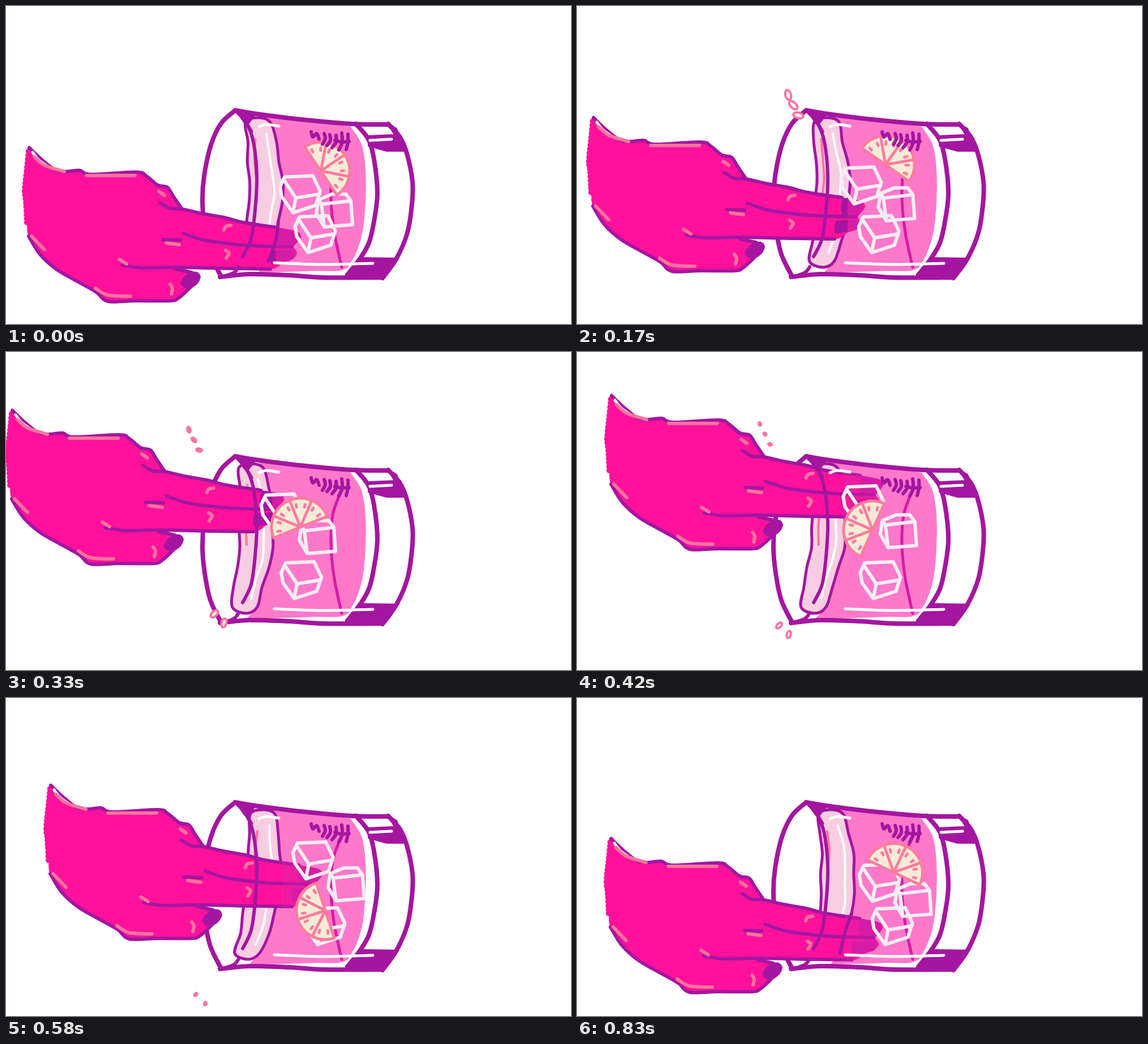
Write an HTML page that moves like this. It is 998 px wide and 561 px high and loops after 910 ms.

```html
<!DOCTYPE html>
<html lang="en">
<head>
<meta charset="utf-8">
<title>Stirring a drink</title>
<style>
  html, body { margin: 0; width: 100%; height: 100%; overflow: hidden; background: #fff; }
  svg { display: block; width: 100%; height: 100%; --ink: #a416a0; --skin: #ff119c; --nail: #a416a0; }
  path { fill: none; stroke-linecap: round; stroke-linejoin: round; }
  .ink { stroke: var(--ink); stroke-width: 6; }
  .thick { stroke-width: 8; }
  .block { fill: var(--ink); stroke: var(--ink); stroke-width: 2; }
  .skin { fill: var(--skin); }
  .nail { fill: var(--nail); }
  .cuff { stroke: var(--skin); stroke-width: 10; stroke-dasharray: 0 7; }
  .blush { stroke: #ff739f; stroke-width: 6; }
  .white { stroke: #fff; stroke-width: 5; }
  .fine { stroke-width: 4; }
  .ice { stroke: #f3eef3; stroke-width: 6; }
  .rind { stroke: #ff7c9e; stroke-width: 5; }
  .foam { fill: #f8cde2; stroke: #a416a0; stroke-width: 5; }
  .liquid { fill: #ff79cb; }
  .straw { stroke: #d81ba6; stroke-width: 5; }
  #wetHand { --ink: #bb18a3; --skin: #f01aa2; --nail: #d61ba4; }
</style>
</head>
<body>
<svg viewBox="0 0 998 561" preserveAspectRatio="none">
  <defs>
    <clipPath id="dry"><rect id="dryBox" x="-50" width="500" height="561"/></clipPath>
    <clipPath id="wet"><rect id="wetBox" width="300" height="561"/></clipPath>
    <g id="hand"></g>
  </defs>
  <g id="back"></g>
  <path id="liquid" class="liquid"/>
  <g id="straw"></g>
  <path id="foam" class="foam"/>
  <path id="foamPink" class="blush fine"/>
  <path id="foamWhite" class="white fine"/>
  <g clip-path="url(#wet)"><use id="wetHand" href="#hand"/></g>
  <g clip-path="url(#dry)"><use id="dryHand" href="#hand"/></g>
  <path id="foamEdge" class="ink"/>
  <path id="iceA" class="ice"/>
  <path id="iceB" class="ice"/>
  <path id="iceC" class="ice"/>
  <g id="slice"></g>
  <g id="front"></g>
  <g id="drops"></g>
</svg>
<script>
const $ = id => document.getElementById(id);
const mix = (a, b, u) => a + (b - a) * u;

function make(tag, attrs) {
  const e = document.createElementNS('http://www.w3.org/2000/svg', tag);
  for (const k in attrs) e.setAttribute(k, attrs[k]);
  return e;
}
const put = (parent, cls, d) => $(parent).appendChild(make('path', { class: cls, d }));

// Smooth curve through points
function curve(pts, closed) {
  const n = pts.length;
  const at = i => closed ? pts[(i + n) % n] : pts[Math.max(0, Math.min(n - 1, i))];
  const ctrl = (p, q, r, s) => [0, 1].map(k => (p[k] + s * (r[k] - q[k]) / 6).toFixed(1));
  let d = 'M' + pts[0];
  for (let i = 0; i < (closed ? n : n - 1); i++) {
    const [a, b, c, e] = [at(i - 1), at(i), at(i + 1), at(i + 2)];
    d += 'C' + ctrl(b, a, c, 1) + ' ' + ctrl(c, b, e, -1) + ' ' + c;
  }
  return d + (closed ? 'Z' : '');
}
const pts = s => s.split(' ').map(p => p.split(',').map(Number));
const draw = (parent, cls, ...lines) => lines.forEach(s => put(parent, cls, curve(pts(s))));

// Hand
const knuckles = '41,250 62,270 85,288 105,292 130,290 150,297 230,293 248,300 268,316 285,320 295,335 310,357';
const finger = '345,366 385,373 420,382 480,391';
const tips = '512,397 521,405 518,413 508,424 514,436 506,447 490,453 466,465 400,464 300,464';
const thumb = '322,467 341,475 338,488 325,497';
const heel = '305,515 290,520 230,520 180,521 160,505 130,488 90,465 60,438 40,406';
const cuff = '37,382 35,345 33,325 37,285 40,254';
put('hand', 'skin', curve(pts([knuckles, finger, tips, thumb, heel, cuff].join(' ')), true));
draw('hand', 'cuff', cuff);
put('hand', 'nail', 'M482,391L512,397Q523,402 517,414L508,424L480,422Q476,405 482,391Z');
put('hand', 'nail', 'M470,432L503,430Q514,436 506,446L490,451L468,455Q464,443 470,432Z');
put('hand', 'block', 'M309,489Q314,476 326,471Q340,466 343,478Q341,489 329,496Q316,502 309,489Z');
draw('hand', 'ink', knuckles, '272,347 290,357 310,358 ' + finger, '325,497 ' + heel,
  '313,401 350,413 400,420 440,423 505,425', '277,412 308,413',
  '205,457 240,462 300,461 400,463 467,464', '300,464 328,470');
draw('hand', 'white', '47,258 57,271 72,282');
draw('hand', 'blush', '50,266 68,281 103,292', '142,299 228,299', '270,327 280,334', '283,418 306,421',
  '200,447 213,455', '45,406 68,430', '158,498 180,510 220,512', '290,491 294,498 292,508',
  '385,395 388,389 397,387', '388,431 394,436 389,445');

// Glass
const inside = '612,213 631,245 638,300 635,380 624,428 601,466';
draw('back', 'ink thick', '405,184 380,207 362,245 350,300 347,345 351,390 361,438 380,477');
draw('straw', 'straw', '589,252 577,288 574,340 580,400 593,461');
draw('front', 'white', inside + ' 540,470 440,473');
put('front', 'block', 'M640,229L686,227L674,207L690,216L704,256L672,256L640,247Z');
put('front', 'block', 'M626,444L692,445L665,481L603,479Z');
put('front', 'block', 'M405,182L440,192L428,208L436,222L420,205Z');
draw('front', 'ink thick', '618,208 640,235 650,270 656,330 650,380 641,418 625,446 603,474',
  '675,208 695,230 708,260 718,310 717,350 709,400 690,445 665,480',
  '405,184 440,190 520,200 610,208 675,209', '378,478 430,473 500,475 560,479 665,479');
draw('front', 'ink', '405,184 425,207 437,240 443,300 440,360 433,410 418,442', '411,460 403,470 381,478',
  '539,222 542,231 549,225 553,235', '562,225 564,234 559,244', '572,227 573,237 567,246',
  '583,228 583,240 576,250', '593,224 594,240 588,254', '604,226 604,240 601,253', '581,237 593,240 606,239');
draw('front', 'white', '643,237 681,235', '447,213 460,209 482,212');
draw('front', 'white thick', '474,453 560,456 648,454');

// Citrus slice and ice, centred on the origin
const wedge = a => `M0,0L${50 * Math.cos(a)},${-50 * Math.sin(a)}`;
put('slice', 'rind', 'M-51,0A51,51 0 0 1 51,0Z').style.fill = '#f5ecd7';
for (let i = 1; i < 4; i++) put('slice', 'rind', wedge(i * Math.PI / 4));
for (let i = 0; i < 8; i++) {
  const a = Math.PI * (i + .5) / 8, x = 36 * Math.cos(a), y = -36 * Math.sin(a);
  put('slice', 'rind fine', `M${x},${y}l${x * .13},${y * .13}`);
}
const cube = 'M-35,-11L-27,-28L23,-30L36,-3L28,22L-12,35L-32,7ZM-29,-24L-7,9L35,2M-7,9L-12,34';
put('iceA', '', '');
$('iceA').setAttribute('d', cube);
$('iceB').setAttribute('d', 'M-25,-12L27,-18L30,24L-20,28ZM-25,-12L-30,-20L-6,-30L18,-30L27,-18M-30,-20L-34,4L-20,28');
$('iceC').setAttribute('d', cube);

// Motion in steps: the hand stirs, ice and foam follow it half a step late
const loop = 910, steps = 11;
const stir = [[0, 0, 0], [2, -12, -53], [4, -30, -147], [5, 20, -173], [7, 38, -96], [8, 43, -60], [10, 19, -2]];
const tumble = [[0, 556, 291, 56], [2, 545, 280, 35], [4, 520, 309, -22], [5, 522, 314, -66], [7, 564, 375, -108], [8, 566, 341, -36]];

function along(path, step) {
  const s = (step + steps) % steps;
  const i = path.findLastIndex(k => k[0] <= s);
  const a = path[i], b = path[(i + 1) % path.length];
  const u = (s - a[0]) / ((b[0] || steps) - a[0]);
  return a.slice(1).map((v, k) => mix(v, b[k + 1], u));
}

const move = (id, x, y, a = 0) => $(id).setAttribute('transform', `translate(${x} ${y}) rotate(${a})`);
const shape = (id, d) => $(id).setAttribute('d', d);

function drop(x, y, tilt, r) {
  return make('ellipse', {
    rx: r, ry: Math.max(2, r * .55), transform: `translate(${x} ${y}) rotate(${tilt})`,
    fill: r > 5 ? '#fff' : '#ff739f', stroke: '#ff739f', 'stroke-width': 4
  });
}

function splash(step) {
  const out = [], up = (step - 2) / 3, down = (step - 4) / 3;
  if (up >= 0 && up <= 1) for (let i = 0; i < 3; i++)
    out.push(drop(373 + 9 * i - 50 * Math.min(1, up * 1.5), 157 + 18 * i - 30 * up, 75 - 30 * i, 9 - 6 * up));
  if (down >= 0 && down <= 1) for (let i = 0; i < 2; i++)
    out.push(drop(368 - 33 * down + 17 * i, 462 + 61 * down + 16 * i, -45 - 30 * i, 8 - 5 * down));
  return out;
}

function show(step) {
  const [hx, hy] = along(stir, step);
  const [lx, ly] = along(stir, step - .5);

  // Foam edges bow outwards; the top sways and the foot pulls back
  const edge = (x, bow, y) => {
    const u = (y - 205) / 245;
    return x + bow * Math.sin(Math.PI * u) + mix(.3 * lx, .15 * hy, u) + 2 * Math.sin(u * 16 + step);
  };
  const side = (x, bow, from, to) => {
    const out = [];
    for (let y = from; y <= to; y += 35) out.push([edge(x, bow, y), y]);
    return out;
  };
  const left = side(420, 8, 205, 450), right = side(464, 23, 205, 450);
  const foot = edge(444, 0, 450);
  shape('foam', curve([[edge(442, 0, 205), 197], ...right, [foot, 461], ...left.reverse()], true));
  shape('foamPink', curve(side(434, 6, 235, 345)));
  shape('foamWhite', curve(side(450, 21, 225, 435)));
  const resting = Math.min(step, steps - step) < 2;
  shape('foamEdge', resting ? curve(side(464, 23, 380, 460)) : '');
  shape('liquid', 'M' + [[444, 192], [520, 202], ...pts(inside), [540, 472], [foot, 472], ...right.reverse()].join('L') + 'Z');

  const water = edge(464, 23, 410 + hy);
  $('dryBox').setAttribute('width', water + 50);
  $('wetBox').setAttribute('x', water);
  move('dryHand', hx, hy);
  move('wetHand', hx, hy);

  move('iceA', 510 + .95 * lx, 330 + .4 * ly);
  move('iceB', 574 + .86 * lx, 362 + .28 * ly);
  move('iceC', 539 + .7 * lx, 400);
  move('slice', ...along(tumble, step));
  $('drops').replaceChildren(...splash(step));
}

let last = -1;
function tick(now) {
  // Drawings change about every 83 ms, on whole 10 ms ticks
  const t = Math.floor(now % loop / 10) * 10;
  const step = Math.min(steps - 1, Math.floor((t + 5) / loop * steps));
  if (step !== last) show(last = step);
  requestAnimationFrame(tick);
}
show(0);
requestAnimationFrame(tick);
</script>
</body>
</html>
```
